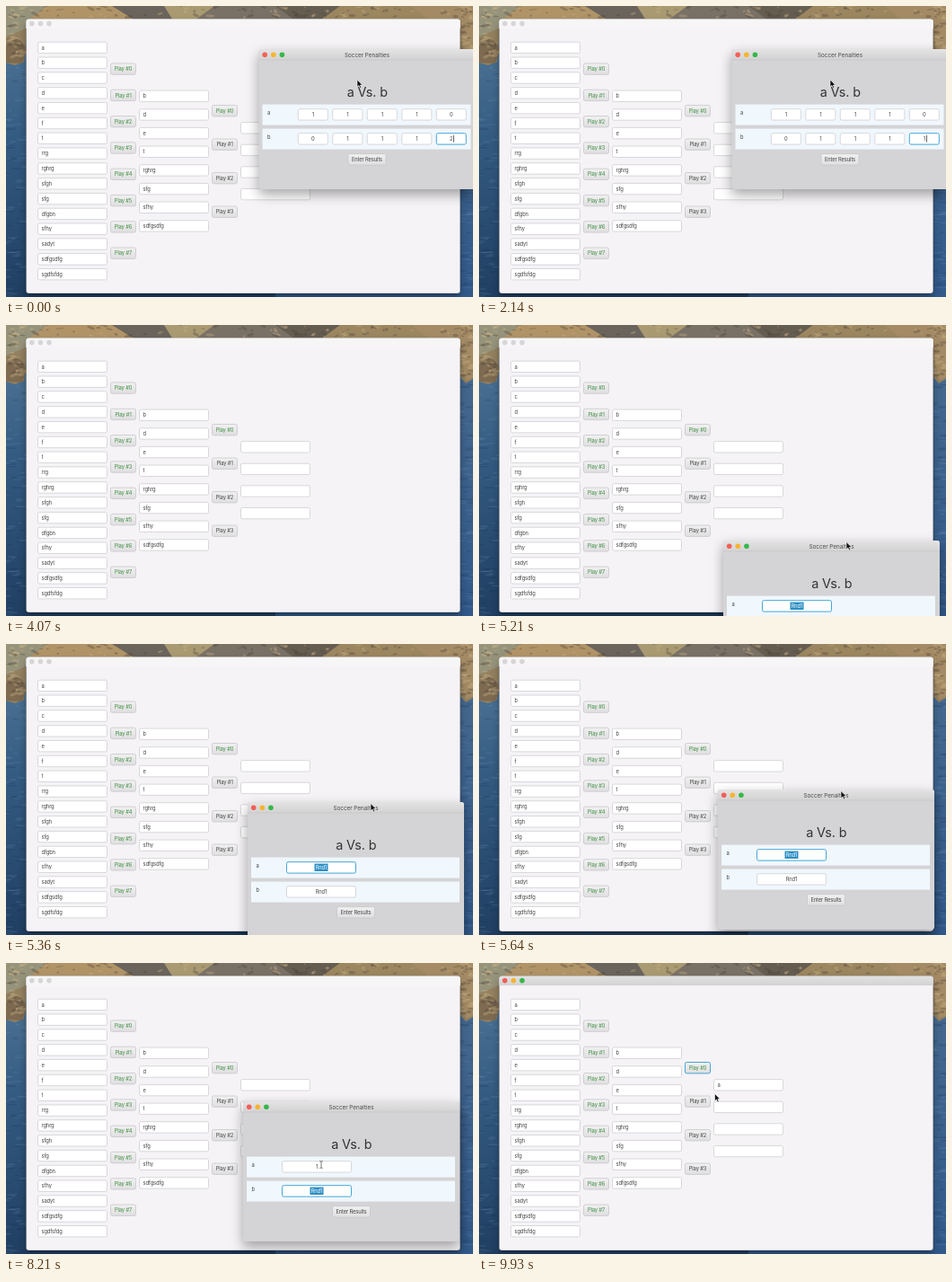
Write an HTML page that moves like this. It is 520 px wide and 324 px high and loops after 10 s.

```html
<!DOCTYPE html>
<html lang="en">
<head>
<meta charset="utf-8">
<title>Penalty bracket</title>
<style>
  html, body { margin: 0; width: 100%; height: 100%; overflow: hidden; }
  svg { display: block; width: 520px; height: 324px; }
  text { font: 5.8px Inter, Roboto, sans-serif; letter-spacing: -.14px; fill: #444; }
  .mid { text-anchor: middle; }
  .done { fill: #3f8f42; }
  .heading { font-size: 14.4px; letter-spacing: -.1px; fill: #333; }
  .caption { font-size: 6.3px; letter-spacing: 0; fill: #484848; }
  .field { fill: #fff; stroke: #d0cfd2; stroke-width: .8; }
  .button { fill: url(#buttonFill); stroke: #c8c7ca; stroke-width: .8; }
  .focus { stroke: #45a6d6; stroke-width: 1; }
  .selected { fill: #fff; }
  .window { filter: drop-shadow(0 6px 7px rgba(0, 0, 0, .35)); }
  .main { filter: drop-shadow(0 5px 4px rgba(0, 0, 0, .3)); }
</style>
</head>
<body>
<svg id="stage" viewBox="0 0 520 324">
  <defs>
    <linearGradient id="sea" x2="0" y2="1">
      <stop offset=".15" stop-color="#4b7193"/>
      <stop offset=".45" stop-color="#345b82"/>
      <stop offset="1" stop-color="#203f62"/>
    </linearGradient>
    <linearGradient id="bay" x2="0" y2="1">
      <stop offset=".15" stop-color="#45698f"/>
      <stop offset="1" stop-color="#31598a"/>
    </linearGradient>
    <linearGradient id="buttonFill" x2="0" y2="1">
      <stop offset="0" stop-color="#f1f0f1"/>
      <stop offset="1" stop-color="#dfdee0"/>
    </linearGradient>
    <linearGradient id="barFill" x2="0" y2="1">
      <stop offset="0" stop-color="#e4e3e4"/>
      <stop offset="1" stop-color="#d3d2d3"/>
    </linearGradient>
  </defs>
  <rect width="520" height="324" fill="url(#sea)"/>
  <rect x="300" width="220" height="324" fill="url(#bay)"/>
  <g id="waves"></g>
  <g id="hills">
    <path d="M0 0H520V60L512 65 504 56 496 20H24L20 62 10 66 0 63Z" fill="#93805f"/>
    <path d="M0 0H60L34 14 20 26 0 34Z" fill="#96937b"/>
    <path d="M46 0H132L150 16H24Z" fill="#b09468"/>
    <path d="M118 0H176L192 16H144Z" fill="#6a645c"/>
    <path d="M176 0H232L214 16H186Z" fill="#a99a72"/>
    <path d="M232 0H312L330 16H210Z" fill="#7a7166"/>
    <path d="M300 0H372L352 16H322Z" fill="#665d51"/>
    <path d="M372 0H452L476 16H350Z" fill="#9b8660"/>
    <path d="M452 0H520V58L512 62 504 20H476Z" fill="#a48b65"/>
    <path d="M0 44L14 36 24 48 18 64 0 63Z" fill="#7d6a50"/>
  </g>
</svg>
<script>
const LOOP = 10000;
const stage = document.getElementById('stage');

function add(parent, tag, attrs, content) {
  const el = document.createElementNS('http://www.w3.org/2000/svg', tag);
  for (const key in attrs) el.setAttribute(key, attrs[key]);
  if (content) el.textContent = content;
  parent.appendChild(el);
  return el;
}
const label = (parent, x, cy, content, cls = '') =>
  add(parent, 'text', { x, y: cy + 2.2, class: cls }, content);
const show = (el, on) => el.setAttribute('visibility', on ? 'inherit' : 'hidden');

function box(parent, cls, x, cy, w) {
  return add(parent, 'rect', { class: cls, x: x + .5, y: cy - 6.1, width: w - 1, height: 12.4, rx: 1.8 });
}
function button(parent, x, cy, w, content, cls = '') {
  const frame = box(parent, 'button', x, cy, w);
  label(parent, x + w / 2, cy, content, 'mid ' + cls);
  return frame;
}
function field(parent, x, cy, w, content) {
  box(parent, 'field', x, cy, w);
  return label(parent, x + 4.5, cy, content);
}

// A centred input with selection and caret.
function input(parent, x, cy, w, content) {
  const mid = x + w / 2;
  const frame = box(parent, 'field', x, cy, w);
  const mark = add(parent, 'rect', { x: mid - 7.5, y: cy - 4.2, width: 15, height: 8.4, fill: '#2c8fc4' });
  const text = label(parent, mid, cy, content, 'mid');
  const caret = add(parent, 'rect', { y: cy - 3.8, width: .7, height: 7.6, fill: '#222' });
  return function set(value, focus, selected, caretOn) {
    frame.classList.toggle('focus', focus);
    text.classList.toggle('selected', selected);
    text.textContent = value;
    show(mark, selected);
    show(caret, caretOn);
    caret.setAttribute('x', mid + (value ? value.length * 1.2 + 1 : .7));
  };
}

function lights(parent, x, cy, colors) {
  return colors.map((fill, i) => add(parent, 'circle', { cx: x + i * 9.6, cy, r: 2.8, fill }));
}
const LIT = ['#f25f57', '#f5b52e', '#35b848'];

// Scrub on the hills and ripples on the water
let seed = 7;
const rand = () => (seed = (seed * 16807) % 2147483647) / 2147483647;
const waves = document.getElementById('waves');
const hills = document.getElementById('hills');
for (let i = 0; i < 160; i++) {
  add(waves, 'ellipse', {
    cx: i % 2 ? rand() * 22 : 506 + rand() * 14, cy: 66 + rand() * 258,
    rx: 2 + rand() * 5, ry: .5 + rand() * .6,
    fill: rand() < .5 ? '#122c4c' : '#7397b8', opacity: .2
  });
  const side = i % 5;
  const x = side === 0 ? rand() * 20 : side === 1 ? 506 + rand() * 14 : rand() * 520;
  const y = rand() * (side < 2 ? 58 : 13);
  add(hills, 'ellipse', {
    cx: x, cy: y, rx: 1 + rand() * 4, ry: .6 + rand() * 1.2,
    fill: rand() < .5 ? '#463e35' : '#d0b788', opacity: .32,
    transform: `rotate(${rand() * 60 - 30} ${x} ${y})`
  });
}

// Bracket window
const main = add(stage, 'g', {});
const frame = add(main, 'g', { class: 'main' });
add(frame, 'rect', {
  x: 22.4, y: 14.4, width: 483.4, height: 305.6, rx: 3,
  fill: '#f5f3f6', stroke: '#000', 'stroke-opacity': .3, 'stroke-width': .8
});
const bar = add(main, 'path', { d: 'M22.4 25V17.4Q22.4 14.4 25.4 14.4H502.8Q505.8 14.4 505.8 17.4V25Z' });
const mainLights = lights(main, 28.8, 19.6, ['', '', '']);

'a b c d e f t rrg rghrg sfgh sfg dfgbn sfhy sadyt sdfgsdfg sgdfsfdg'.split(' ')
  .forEach((s, i) => field(main, 35, 46.3 + i * 16.82, 78, s));
for (let i = 0; i < 8; i++) button(main, 116, 70 + i * 29.3, 29, 'Play #' + i, 'done');
'b d e t rghrg sfg sfhy sdfgsdfg'.split(' ')
  .forEach((s, i) => field(main, 148, 100.2 + i * 20.66, 78, s));
const plays = [0, 1, 2, 3].map(i =>
  button(main, 229, 116.6 + i * 37.5, 29, 'Play #' + i, i ? '' : 'done'));
const winner = [0, 1, 2, 3].map(i => field(main, 261, 135.7 + i * 24.6, 78, ''))[0];

// Penalty dialogs
function dialog(rowA, rowB, x0, step, w) {
  const g = add(stage, 'g', {});
  const shell = add(g, 'g', { class: 'window' });
  add(shell, 'rect', { width: 241, height: 156, rx: 3, fill: '#d4d3d5' });
  add(g, 'path', { d: 'M0 12V3Q0 0 3 0H238Q241 0 241 3V12Z', fill: 'url(#barFill)' });
  add(g, 'rect', { y: 11.7, width: 241, height: .6, fill: '#c2c1c2' });
  lights(g, 6.7, 6.3, LIT);
  label(g, 120.5, 6.4, 'Soccer Penalties', 'mid caption');
  add(g, 'text', { x: 120.8, y: 52.7, class: 'mid heading' }, 'a Vs. b');
  const sets = [rowA, rowB].map((row, r) => {
    const y = r * 27;
    add(g, 'rect', { x: 4, y: 61.6 + y, width: 232, height: 23, fill: '#f0f7fd' });
    label(g, 9.5, 70.5 + y, 'ab'[r]);
    return row.map((v, i) => {
      const set = input(g, x0 + i * step, 72.8 + y, w, v);
      set(v, false, false, false);
      return set;
    });
  });
  button(g, 99, 122.8, 43, 'Enter Results');
  return { g, sets };
}
const shots = dialog([...'11110'], [...'01111'], 43.3, 38.5, 34);
const extra = dialog(['Rnd1'], ['Rnd1'], 43, 0, 78);
const lastShot = shots.sets[1][4];
const extraA = extra.sets[0][0], extraB = extra.sets[1][0];
shots.g.setAttribute('transform', 'translate(281.5 48)');

// Pointer
const arrow = add(stage, 'path', {
  d: 'M0 0V8.2L1.9 6.5 3.2 9.4 4.6 8.8 3.4 6H5.9Z',
  fill: '#111', stroke: '#fff', 'stroke-width': .6
});
const beam = add(stage, 'path', {
  d: 'M-1.7 -4.5Q0 -4.5 0 -3.5Q0 -4.5 1.7 -4.5M0 -3.5V2.5M-1.7 3.5Q0 3.5 0 2.5Q0 3.5 1.7 3.5',
  fill: 'none', stroke: '#444', 'stroke-width': .7
});

const dragPath = [
  [5070, 276, 318], [5140, 274, 282], [5210, 272, 240], [5290, 270, 199],
  [5360, 269, 176], [5640, 266, 162], [6070, 264, 154]
];
const pointerPath = [
  [0, 391, 82], [2790, 391, 82], [3430, 399, 170], [3640, 399, 170], [4070, 424, 332], [5000, 424, 332]
];
const latePath = [
  [6070, 401, 155.5], [6140, 401, 155.5], [6500, 375.5, 146], [6930, 365, 196], [7430, 365, 196],
  [7640, 351, 225], [8430, 351, 225], [9000, 387, 276], [9430, 387, 276], [9930, 262.5, 145.5]
];
const linear = u => u;
const smooth = u => u * u * (3 - 2 * u);

function along(path, t, ease) {
  let i = 0;
  while (i < path.length - 2 && t >= path[i + 1][0]) i++;
  const [t0, x0, y0] = path[i], [t1, x1, y1] = path[i + 1];
  const u = ease(Math.min(1, Math.max(0, (t - t0) / (t1 - t0))));
  return [x0 + (x1 - x0) * u, y0 + (y1 - y0) * u];
}
const move = (el, [x, y]) => el.setAttribute('transform', `translate(${x} ${y})`);
// Carets toggle every half second after the last key.
const blink = (t, since) => t >= since && Math.floor((t - since) / 500) % 2 === 0;

function render(t) {
  const open = t >= 5070 && t < 9140;
  show(shots.g, t < 3640);
  show(extra.g, open);

  const typed = t < 290 ? '2' : t < 2070 ? '' : '1';
  const lastKey = t < 290 ? 0 : t < 2070 ? 360 : 2140;
  lastShot(typed, true, false, t < 3640 && blink(t, lastKey));

  const drag = along(dragPath, t, linear);
  move(extra.g, drag);
  const onA = t < 8210;
  extraA(t < 8000 ? 'Rnd1' : '1', onA, open && t < 7790, open && onA && blink(t, 7790));
  extraB(t < 8360 ? 'Rnd1' : '1', !onA, open && !onA && t < 8360, open && blink(t, 8360));

  const active = t >= 9140;
  bar.setAttribute('fill', active ? 'url(#barFill)' : '#f7f6f7');
  mainLights.forEach((c, i) => c.setAttribute('fill', active ? LIT[i] : '#d6d5d7'));
  plays[0].classList.toggle('focus', active);
  winner.textContent = active ? 'a' : '';

  const pos = t < 5070 ? along(pointerPath, t, smooth)
    : t < 6070 ? [drag[0] + 137, drag[1] + 1.5]
    : along(latePath, t, smooth);
  const overField = t >= 7600 && t < 8570;
  show(arrow, !overField);
  show(beam, overField);
  move(arrow, pos);
  move(beam, pos);
}

let start;
function tick(now) {
  start ??= now;
  render((now - start) % LOOP);
  requestAnimationFrame(tick);
}
render(0);
requestAnimationFrame(tick);
</script>
</body>
</html>
```
